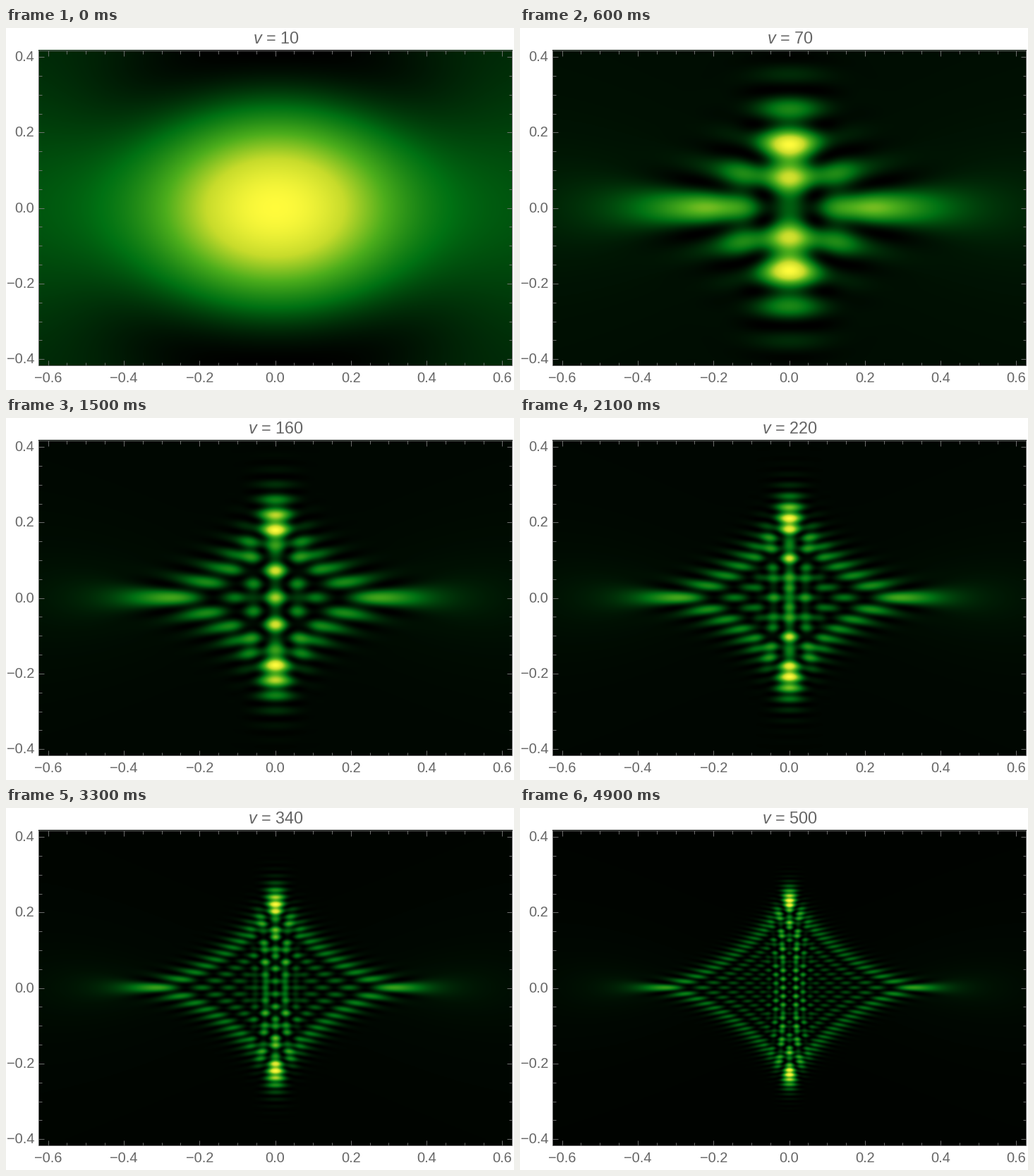
Animation of 720x514 px, one loop 5000 ms. Source, as a matplotlib script:

```python
import numpy as np
import matplotlib.pyplot as plt
from matplotlib.animation import FuncAnimation
from matplotlib.colors import LinearSegmentedColormap
from matplotlib.patches import Rectangle

WIDTH, HEIGHT, DPI = 720, 514, 100
FRAMES, INTERVAL = 50, 100
LEFT, RIGHT, TOP, BOTTOM = 46, 717.3, 32, 479.3
CX, CY, UNIT = 381.5, 255.6, 536.4      # plot centre and pixels per unit
X_MAX, Y_MAX = 0.625, 5 / 12
GRAY = "#666666"

STRENGTH = 0.65                         # peak phase of the lens
HALF = 4.0                              # half size of the lens plane

plt.rcParams.update({
    "font.family": "Liberation Sans",
    "mathtext.fontset": "custom",
    "mathtext.rm": "Liberation Sans",
    "mathtext.it": "Liberation Sans:italic",
})

avocado = LinearSegmentedColormap.from_list("avocado", [
    (0, 0, 0), (0, 0.443, 0.075), (0.30, 0.68, 0.11),
    (0.78, 0.86, 0.17), (1, 0.985, 0.235)], N=1024)

# One quadrant of the screen; the others are its mirror images.
mu_x = (np.arange(336) + 0.5) * X_MAX / 336
mu_y = (np.arange(224) + 0.5) * Y_MAX / 224


def fresnel(mu, k, basis, nu):
    """Matrix that carries an even field from the lens to the points mu."""
    weight = np.full(len(k), 2 / len(k))
    weight[0] /= 2
    modes = np.cos(np.outer(mu, k)) * weight * np.exp(-0.5j * k**2 / nu)
    return modes.astype(np.complex64) @ basis


def intensity(nu):
    """Scaled brightness behind the lens a / (1 + x^2 + 2 y^2)."""
    n = int(0.9 * nu + 120)
    x = (np.arange(n) + 0.5) * HALF / n
    k = np.arange(n) * np.pi / HALF
    basis = np.cos(np.outer(k, x)).astype(np.complex64)
    phase = nu * STRENGTH / (1 + x[None, :]**2 + 2 * x[:, None]**2)
    field = np.exp(1j * phase).astype(np.complex64)
    psi = fresnel(mu_y, k, basis, nu) @ field @ fresnel(mu_x, k, basis, nu).T
    quad = np.abs(psi)**2
    quad = (quad - quad.min()) / (quad.max() - quad.min())
    half = np.hstack([quad[:, ::-1], quad])
    return np.vstack([half[::-1], half])


def pt(px):
    return px * 72 / DPI


def number(value):
    return f"{value:.1f}".replace("-", "\u2212")


fig = plt.figure(figsize=(WIDTH / DPI, HEIGHT / DPI), dpi=DPI, facecolor="white")
ax = fig.add_axes([0, 0, 1, 1])
image = ax.imshow(np.zeros((448, 672)), cmap=avocado, vmin=0, vmax=1,
                  extent=(LEFT, RIGHT, BOTTOM, TOP), interpolation="bilinear",
                  aspect="auto")
ax.set_xlim(0, WIDTH)
ax.set_ylim(HEIGHT, 0)
ax.axis("off")

ax.add_patch(Rectangle((LEFT, TOP), RIGHT - LEFT, BOTTOM - TOP, fill=False,
                       edgecolor=GRAY, lw=pt(1)))


def tick(xs, ys):
    ax.plot(xs, ys, color="#7a7a7a", lw=pt(0.9), solid_capstyle="butt")


for i in range(-12, 13):
    major = i % 4 == 0
    size = 7.5 if major else 4.5
    value = i / 20
    px = CX + value * UNIT
    tick([px, px], [BOTTOM, BOTTOM - size])
    tick([px, px], [TOP, TOP + size])
    if major:
        ax.text(px, 503.3, number(value), color=GRAY, fontsize=pt(20),
                ha="center", va="baseline")
    if abs(value) > Y_MAX:
        continue
    py = CY - value * UNIT
    tick([LEFT, LEFT + size], [py, py])
    tick([RIGHT, RIGHT - size], [py, py])
    if major:
        ax.text(40, py + 6, number(value), color=GRAY, fontsize=pt(20),
                ha="right", va="baseline")

title = ax.text(382.7, 22, "", color=GRAY, fontsize=pt(23.4),
                ha="center", va="baseline")


def update(frame):
    nu = 10 * (frame + 1)
    image.set_data(intensity(nu))
    title.set_text(f"$v$ = {nu}")
    return image, title


anim = FuncAnimation(fig, update, frames=FRAMES, interval=INTERVAL,
                     repeat=True, repeat_delay=0, blit=False)
plt.show()
```
